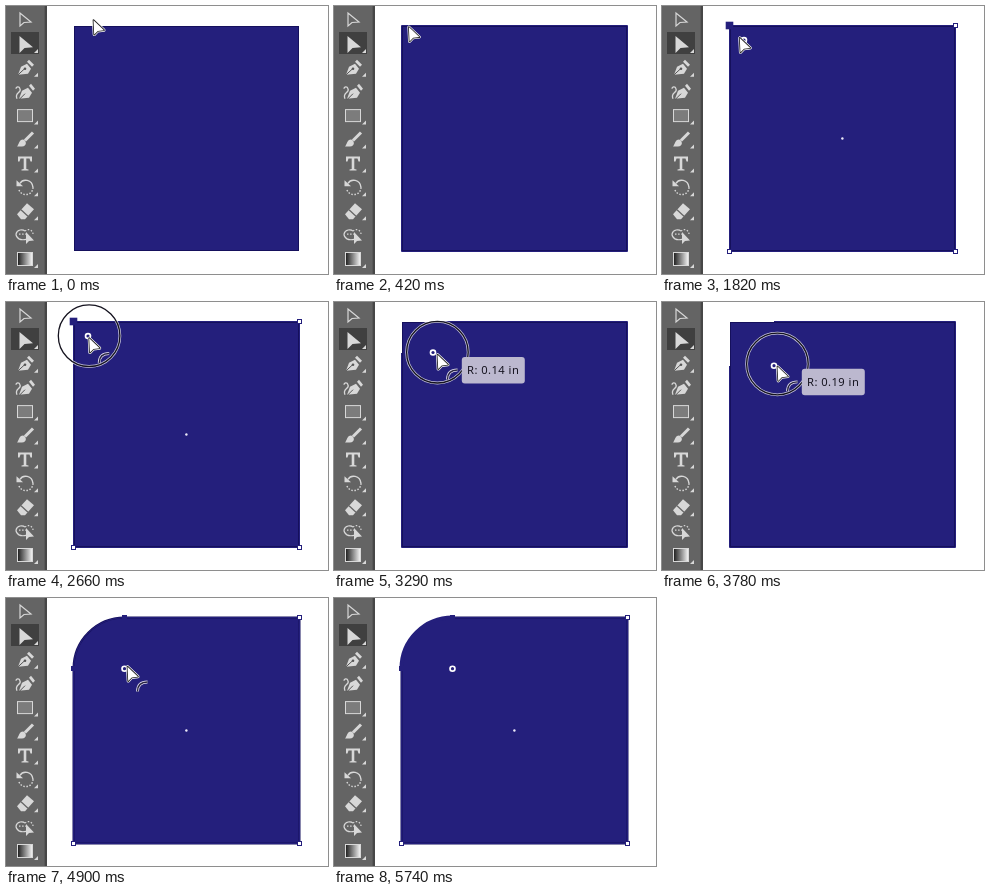
These frames come from a looping animation (322x268 px, 5880 ms). An HTML page with a canvas:

```html
<!DOCTYPE html>
<html lang="en">
<head>
<meta charset="utf-8">
<title>Rounding a corner</title>
<style>
html, body { margin: 0; width: 100%; height: 100%; overflow: hidden; background: #fff; }
canvas { display: block; width: 322px; height: 268px; }
</style>
</head>
<body>
<canvas id="stage" width="322" height="268"></canvas>
<script>
const ctx = document.getElementById('stage').getContext('2d');
const LOOP = 5880, STEP = 70;
const NAVY = '#241f7c', EDGE = '#15105c', ICON = '#d8d8d8';
const L = 67.5, T = 19.5, R = 293.5, B = 245.5, RADIUS = 51;
const FONT = '"Noto Sans", "Open Sans", sans-serif';

// Key points: time, x, y
const tipPath = [
  [0, 87, 12], [70, 87, 12], [630, 68.5, 22], [1540, 68.5, 22],
  [2100, 86, 37.5], [2380, 82.7, 34], [2660, 82.7, 34], [3290, 103, 50.5],
  [3780, 115, 62.3], [4480, 121, 66.5], [5250, 121, 66.5], [5740, 150, 272]
];
const widgetPath = [
  [2660, 82, 34], [3290, 99, 50.5], [3780, 112, 63.7], [4480, 118.5, 70.7]
];

function along(path, t) {
  if (t <= path[0][0]) return path[0].slice(1);
  for (let i = 1; i < path.length; i++) {
    const [t1, x1, y1] = path[i];
    if (t > t1) continue;
    const [t0, x0, y0] = path[i - 1];
    let k = (t - t0) / (t1 - t0);
    if (t < 2400 || t > 5000) k = k * k * (3 - 2 * k);
    return [x0 + (x1 - x0) * k, y0 + (y1 - y0) * k];
  }
  return path[path.length - 1].slice(1);
}

function fill(d, color) {
  ctx.fillStyle = color;
  ctx.fill(new Path2D(d));
}

function line(d, color, width) {
  ctx.strokeStyle = color;
  ctx.lineWidth = width;
  ctx.stroke(new Path2D(d));
}

function dashed(d, color, width) {
  ctx.setLineDash([1.5, 1.6]);
  line(d, color, width);
  ctx.setLineDash([]);
}

function box(x, y, w, h, color) {
  ctx.fillStyle = color;
  ctx.fillRect(x, y, w, h);
}

function disc(x, y, r, color) {
  ctx.fillStyle = color;
  ctx.beginPath();
  ctx.arc(x, y, r, 0, 7);
  ctx.fill();
}

function ring(x, y, r, color, width) {
  ctx.strokeStyle = color;
  ctx.lineWidth = width;
  ctx.beginPath();
  ctx.arc(x, y, r, 0, 7);
  ctx.stroke();
}

function at(x, y, draw) {
  ctx.save();
  ctx.translate(x, y);
  draw();
  ctx.restore();
}

function text(str, x, y, size, color, spacing = 0) {
  ctx.font = size + 'px ' + FONT;
  ctx.letterSpacing = spacing + 'px';
  ctx.fillStyle = color;
  ctx.fillText(str, x, y);
}

const pen = 'M-7 7L-4-1L2-4L6 1L3 6Z';
const tools = [
  () => line('M-5-7V6L-1 2.5L6 2Z', ICON, 1.2),
  () => fill('M-5.5-8V9L-.5 4L8 3.3Z', ICON),
  () => {
    fill(pen, ICON);
    fill('M2-6L4-8L9-3L7-1Z', ICON);
    line('M-7 7L-1 1.5', '#555', 1);
    disc(0, 1, 1.3, '#555');
  },
  () => {
    at(1, 0, () => fill(pen, ICON));
    fill('M4-6L6-8L10-3L8-1Z', ICON);
    line('M-6 8L0 2', '#555', 1);
    line('M-8 7C-11 1-3 1-5-3C-6-6-9-5-9-3', ICON, 1.3);
  },
  () => {
    box(-7.5, -6, 15, 12, '#7c7c7c');
    ctx.strokeStyle = ICON;
    ctx.lineWidth = 1;
    ctx.strokeRect(-7.5, -6, 15, 12);
  },
  () => {
    line('M8-7L0 1', ICON, 3);
    fill('M-8 7C-6 5-6 0-2 0C2 1 2 7-3 7Z', ICON);
  },
  () => fill('M-7-7H7V-2H5.5L4.5-5H1.3V5.5L3.5 6V7H-3.5V6L-1.3 5.5V-5H-4.5L-5.5-2H-7Z', ICON),
  () => {
    line('M-5-4C-2-9 7-8 8 0', ICON, 1.4);
    dashed('M8 0C8 9-5 10-6.5 1', ICON, 1.4);
    fill('M-8.5-7V-1H-2Z', ICON);
  },
  () => {
    fill('M-8 3L2-8L9-2L0 8H-4Z', ICON);
    line('M-4-1.5L3 5', '#646464', 1.2);
  },
  () => {
    line('M2 4C-5 6-9 3-9-1C-8-6-2-6 0-4', ICON, 1.2);
    dashed('M0-4C3-7 8-5 8-1', ICON, 1.2);
    dashed('M-6-1H2', ICON, 1.3);
    fill('M1-3V9L4 6L9 5.5Z', ICON);
  },
  () => {
    const g = ctx.createLinearGradient(-7, 0, 8, 0);
    g.addColorStop(0, '#222');
    g.addColorStop(1, '#fff');
    box(-7.5, -6.5, 15, 13, g);
    ctx.strokeStyle = ICON;
    ctx.lineWidth = 1;
    ctx.strokeRect(-7.5, -6.5, 15, 13);
  }
];

function panel() {
  box(0, 0, 41, 268, '#646464');
  box(38, 0, 1, 268, '#595959');
  box(39, 0, 2, 268, '#474747');
  box(5, 26, 28, 22, '#404040');
  tools.forEach((draw, i) => {
    const y = 14 + i * 23.9;
    at(19, y, draw);
    if (![0, 3, 9].includes(i)) {
      at(32, y + 9, () => fill('M0-4V0H-4Z', ICON));
    }
  });
}

// The body sits one pixel inside its highlight line.
function shape(t, cut, released, lit) {
  if (released) {
    const r = RADIUS;
    const arc = `M${L} ${T + r}A${r} ${r} 0 0 1 ${L + r} ${T}`;
    const body = `${arc}H${R}V${B}H${L}Z`;
    fill(body, NAVY);
    line(body, EDGE, 2);
    line(body, NAVY, 1);
    if (t >= 5460) line(arc, NAVY, 4);
    return;
  }
  const w = R - L - 1;
  box(L + .5, T + .5, w, w, EDGE);
  box(L + 1.5, T + 1.5, w - 2, w - 2, NAVY);
  if (lit) line(`M${L + cut} ${T}H${R}V${B}H${L}V${T + cut}${cut ? '' : 'Z'}`, NAVY, 1);
}

function anchor(x, y, size, hollow) {
  const h = size / 2;
  box(x - h, y - h, size, size, NAVY);
  if (hollow) box(x - h + 1, y - h + 1, size - 2, size - 2, '#fff');
}

function anchors(released) {
  [[R, T], [R, B], [L, B]].forEach(p => anchor(p[0], p[1], 5, true));
  if (released) {
    anchor(L + RADIUS, T, 5);
    anchor(L, T + RADIUS, 5);
  } else {
    anchor(L, T, 7.6);
  }
  disc(180.4, 132.5, 1.2, '#eceaf8');
}

function widget(x, y) {
  disc(x, y, 3.3, '#fff');
  disc(x, y, 1.6, NAVY);
}

function halo(x, y) {
  ring(x, y, 30.8, '#ffffffbb', 2.8);
  ring(x, y, 30.8, '#15131f', 1.3);
}

function cursor(x, y, badge) {
  const arrow = 'M.5 2.2L1.2 16.6L4.8 12.9L11 12.2Z';
  at(x, y, () => {
    ctx.lineJoin = 'round';
    line(arrow, '#fff', 3);
    line(arrow, '#222', 1.7);
    fill(arrow, '#fff');
    ctx.lineJoin = 'miter';
    if (badge === 'square') {
      box(8, 15, 8, 8, '#fff');
      box(9, 16, 6, 6, '#222');
      box(10.5, 17.5, 3, 3, '#fff');
    } else if (badge === 'arc') {
      const arc = 'M10.5 27C10.5 21 14 17.5 20.5 17.5';
      line(arc, '#dcd9ec', 2.8);
      line(arc, '#27233f', 1.3);
    }
  });
}

function tip(x, y, w, h, color) {
  ctx.fillStyle = color;
  ctx.beginPath();
  ctx.roundRect(x, y, w, h, 3);
  ctx.fill();
}

function draw(t) {
  const [x, y] = along(tipPath, t);
  const [wx, wy] = along(widgetPath, t);
  const dragging = t >= 2730 && t < 4550;
  const released = t >= 4550;
  const selected = t >= 1120 && !dragging;
  const hover = t >= 560 && t < 1540;
  const resizing = dragging && t >= 2870;

  box(0, 0, 322, 268, '#fff');
  panel();
  shape(t, resizing ? wx - L : 0, released, t >= 70);

  if (selected) anchors(released);
  if (hover) {
    if (!selected) anchor(L + .5, T + .5, 8, true);
    text('anchor', 73, 18, 9.2, '#b65ab8');
  }
  if (selected || dragging) widget(wx, wy);

  if ((t >= 1050 && t < 1330) || (t >= 2660 && t < 4550)) halo(x + .4, y - .3);

  if (t >= 840 && t < 1540) {
    tip(107.5, 19.5, 52.5, 27.5, '#cfcfd3');
    text('X: 2 in', 113, 30.5, 9.7, '#161616');
    text('Y: 4.82 in', 113, 41.5, 9.7, '#161616');
  }
  if (resizing) {
    tip(x + 24.8, y + 4.5, 63, 26.5, '#bcb8cf');
    text('R: ' + ((wx - L) * .0043).toFixed(2) + ' in', x + 30, y + 21.8, 11.2, '#15131f', .45);
  }

  cursor(x, y, hover ? 'square' : t >= 2030 ? 'arc' : '');
}

const start = performance.now();
function frame() {
  const t = (performance.now() - start) % LOOP;
  draw(Math.floor(t / STEP) * STEP);
  requestAnimationFrame(frame);
}
frame();
</script>
</body>
</html>
```
